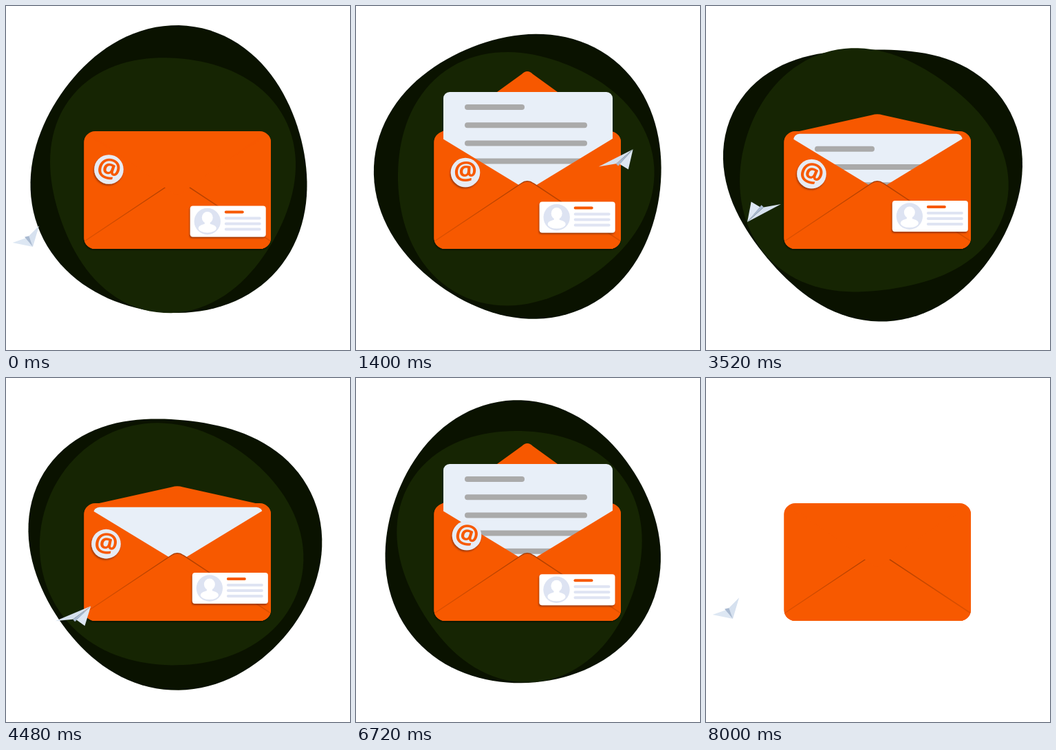
Recreate the animation shown at these times as an HTML page. Size 500x500 px, loop 8.04 s.

```html
<!DOCTYPE html>
<html lang="en">
<head>
<meta charset="utf-8">
<title>Newsletter envelope</title>
<style>
  html, body { margin: 0; width: 100%; height: 100%; overflow: hidden; background: #fff; }
  svg { display: block; width: 100vw; height: 100vh; }
  .lines { stroke: #aaa; stroke-width: 8; stroke-linecap: round; }
  .rows { stroke: #dfe4f3; stroke-width: 4; stroke-linecap: round; }
  .at { font: 700 38px "Open Sans", "Noto Sans", sans-serif; text-anchor: middle; fill: #f75900; }
</style>
</head>
<body>
<svg viewBox="0 0 500 500">
  <defs>
    <clipPath id="body"><rect x="113.5" y="182" width="271.5" height="171" rx="16"/></clipPath>
    <clipPath id="face"><circle cx="25" cy="22.5" r="18"/></clipPath>
    <linearGradient id="fold" gradientUnits="userSpaceOnUse" x1="0" y1="252" x2="0" y2="342">
      <stop offset="0" stop-color="#a83c00"/>
      <stop offset="1" stop-color="#c84800" stop-opacity=".55"/>
    </linearGradient>
    <filter id="soft" x="-20%" y="-20%" width="140%" height="140%">
      <feDropShadow dx="-1" dy="2" stdDeviation="1.2" flood-color="#000" flood-opacity=".4"/>
    </filter>
    <filter id="lift" x="-20%" y="-20%" width="140%" height="150%">
      <feDropShadow dx="-1" dy="2" stdDeviation=".8" flood-color="#7a2c00" flood-opacity=".7"/>
    </filter>
    <path id="flap" d="M122 0 L241 -86 Q249 -94 257 -86 L376 0Z"/>
  </defs>

  <path id="outer" fill="#0a1200"/>
  <path id="inner" fill="#162503"/>
  <g id="planeBack"></g>

  <g id="envelope">
    <use id="flapBack" href="#flap" fill="#f75900"/>
    <rect x="113.5" y="182" width="271.5" height="171" rx="16" fill="#f75900"/>
  </g>
  <g id="letter">
    <rect x="127" y="125" width="246" height="150" rx="9" fill="#e8eff8"/>
    <g id="lines" class="lines"></g>
  </g>
  <g clip-path="url(#body)">
    <path d="M113 185 L243 264 H256 L386 185 V353 H113Z" fill="#f75900"/>
    <path d="M114 342 L240 258 Q249 251.500 258 258 L385 342 V360 H114Z" fill="#f75900"/>
    <path d="M114 342 L240 258 Q249 251.500 258 258 L385 342" fill="none" stroke="url(#fold)" stroke-width="1.5"/>
    <use id="flapFront" href="#flap" fill="#f75900"/>
  </g>

  <g id="badge">
    <circle r="21.300" fill="#e7ebf4" filter="url(#lift)"/>
    <text id="at" class="at" y="11.500">@</text>
  </g>

  <g id="card">
    <rect width="110" height="45" rx="4" fill="#fff" filter="url(#lift)"/>
    <circle cx="25" cy="22.500" r="19.200" fill="#dde3f2"/>
    <g fill="#fff" clip-path="url(#face)">
      <ellipse cx="25" cy="17" rx="8" ry="8.500"/>
      <rect x="21" y="20" width="8" height="9"/>
      <ellipse cx="25" cy="32.500" rx="13" ry="6.500"/>
    </g>
    <path class="rows" d="M52 18H101M52 26H101M52 34H101"/>
    <path class="rows" d="M52 9H76" style="stroke:#f75900"/>
  </g>
  <g id="planeFront"></g>
</svg>

<script>
const LOOP = 8040, CYCLE = 8000, HALF = 4000, STEP = 40;
const $ = id => document.getElementById(id);
const svgEl = tag => document.createElementNS("http://www.w3.org/2000/svg", tag);

// A value that swings once per cycle u = 0..1, highest at `peak`.
const wave = (u, mean, swing, peak) => mean + swing * Math.cos(2 * Math.PI * (u - peak));

// Blobs are circles bent by three harmonics whose strengths swing over the cycle.
const outerBlob = u => ({
  radius: wave(u, 205.2, 2.8, .28),
  cos: [wave(u, 2.4, 2.8, .5), wave(u, 2.5, 7, .45), wave(u, -1.5, 5, .7)],
  sin: [wave(u, 1.3, 4, .45), wave(u, 2, 3, .55), wave(u, -2, 8.5, .92)]
});
const innerBlob = u => ({
  radius: wave(u, 183, 3, .33),
  cos: [wave(u, -.8, 1.3, .05), wave(u, 2.7, 6.8, .45), wave(u, 3.2, 5, .28)],
  sin: [wave(u, 3.7, 4.5, .95), wave(u, 2.5, 3.8, .65), wave(u, -1.5, 7, .43)]
});

function blobPath({ radius, cos, sin }) {
  const pts = [];
  for (let deg = 0; deg < 360; deg += 3) {
    const a = deg * Math.PI / 180;
    const r = cos.reduce((sum, c, i) =>
      sum + c * Math.cos((i + 1) * a) + sin[i] * Math.sin((i + 1) * a), radius);
    pts.push([240 + r * Math.cos(a), 245 + r * Math.sin(a)]);
  }
  return "M" + pts.join("L") + "Z";
}

// Key points: time, x, y
const badgeRoute = [
  [0, 149.5, 237.5], [1400, 159, 242], [2680, 154, 240],
  [3520, 153.5, 244], [5360, 141.5, 237], [6720, 161, 229]
];
const planeRoute = [
  [0, 39, 350], [160, 44, 362], [320, 75, 352], [1360, 393, 213],
  [1880, 468, 160], [2100, 452, 135], [2600, 322, 200], [3520, 60, 314]
];

// Smooth closed route through the key points.
function along(route, period, time) {
  const n = route.length;
  const at = k => {
    const lap = Math.floor(k / n);
    const [t, x, y] = route[k - lap * n];
    return [t + lap * period, x, y];
  };
  let i = n - 1;
  while (route[i][0] > time) i--;
  const [a, b, c, d] = [at(i - 1), at(i), at(i + 1), at(i + 2)];
  const span = c[0] - b[0], u = (time - b[0]) / span, w = u * u * (3 - 2 * u);
  return [1, 2].map(j => {
    const m0 = (c[j] - a[j]) / (c[0] - a[0]) * span;
    const m1 = (d[j] - b[j]) / (d[0] - b[0]) * span;
    return b[j] * (1 - w) + c[j] * w + m0 * u * (1 - u) ** 2 - m1 * u * u * (1 - u);
  });
}

const ramp = (t, from, to) => Math.min(1, Math.max(0, (t - from) / (to - from)));
const ease = (t, from, to) => (1 - Math.cos(Math.PI * ramp(t, from, to))) / 2;

const lineEls = Array.from({ length: 5 }, () => $("lines").appendChild(svgEl("path")));
const planeEls = ["#d6e1ef", "#dde7f3", "#a9bad1"].map(fill => {
  const el = svgEl("path");
  el.setAttribute("fill", fill);
  return el;
});

// The plane points along its route; its wings spread as it slows to turn.
function drawPlane(p) {
  const gap = 10;
  const [x, y] = along(planeRoute, HALF, p);
  const [x0, y0] = along(planeRoute, HALF, (p - gap + HALF) % HALF);
  const [x1, y1] = along(planeRoute, HALF, (p + gap) % HALF);
  const speed = Math.hypot(x1 - x0, y1 - y0) / (2 * gap);
  const fast = ramp(speed, .08, .23);
  const tail = Math.atan2(y0 - y1, x0 - x1);
  const spread = (95 - 45 * fast) * Math.PI / 180;
  const polar = (a, r) => [r * Math.cos(a), r * Math.sin(a)];
  const long = polar(tail, 32 + 24 * fast), short = polar(tail - spread, 30);
  const mix = (a, b) => [x + a * long[0] + b * short[0], y + a * long[1] + b * short[1]];
  const nose = mix(0, 0), fold = mix(.45, .33), keel = mix(.36, .52);
  const faces = [[nose, mix(1, 0), fold], [nose, mix(.33, .45), mix(0, 1)], [nose, fold, keel]];
  const home = $(p < HALF / 2 ? "planeFront" : "planeBack");
  planeEls.forEach((el, i) => {
    el.setAttribute("d", "M" + faces[i].join("L") + "Z");
    if (el.parentNode !== home) home.appendChild(el);
  });
}

const show = (id, on) => $(id).setAttribute("visibility", on ? "visible" : "hidden");
const move = (id, x, y, extra = "") => $(id).setAttribute("transform", `translate(${x} ${y}) ${extra}`);

function draw(time) {
  const last = time >= CYCLE;
  const t = time % CYCLE, p = t % HALF, u = t / CYCLE;

  ["outer", "inner", "badge", "card"].forEach(id => show(id, !last));
  $("envelope").setAttribute("filter", last ? "none" : "url(#soft)");
  $("outer").setAttribute("d", blobPath(outerBlob(u)));
  $("inner").setAttribute("d", blobPath(innerBlob(u)));

  const open = ease(p, 240, 640) - ease(p, 3360, 3760);
  const tilt = 2 * open - 1;
  move("flapBack", 0, 185, `scale(1 ${Math.max(tilt, 0.001)})`);
  move("flapFront", 0, 185, `scale(1 ${Math.min(tilt, -0.001)})`);
  show("flapBack", tilt > 0);
  show("flapFront", tilt <= 0);

  const up = ease(p, 460, 900) - ease(p, 3080, 3580);
  move("letter", 0, 63 * (1 - up));
  show("letter", tilt > -0.2);
  lineEls.forEach((el, i) => {
    const from = 820 + 140 * i, drawn = ramp(p, from, from + 140);
    const width = i ? 170 : 79;
    el.setAttribute("d", drawn ? `M162 ${147 + 26.2 * i}h${width * drawn}` : "");
  });

  move("badge", ...along(badgeRoute, CYCLE, t));
  $("at").setAttribute("transform", `rotate(${wave(2 * u, 10, 10, .86)})`);
  move("card", 269 + wave(u, 0, -2.5, 0) + wave(3 * u, 0, 1.2, 0),
    284.5 + wave(u, 0, 3.5, 0) + wave(2 * u, 0, 2.5, 0));
  drawPlane(p);
}

const start = performance.now();
function tick() {
  const t = (performance.now() - start) % LOOP;
  draw(Math.floor(t / STEP) * STEP);
  requestAnimationFrame(tick);
}
tick();
</script>
</body>
</html>
```
